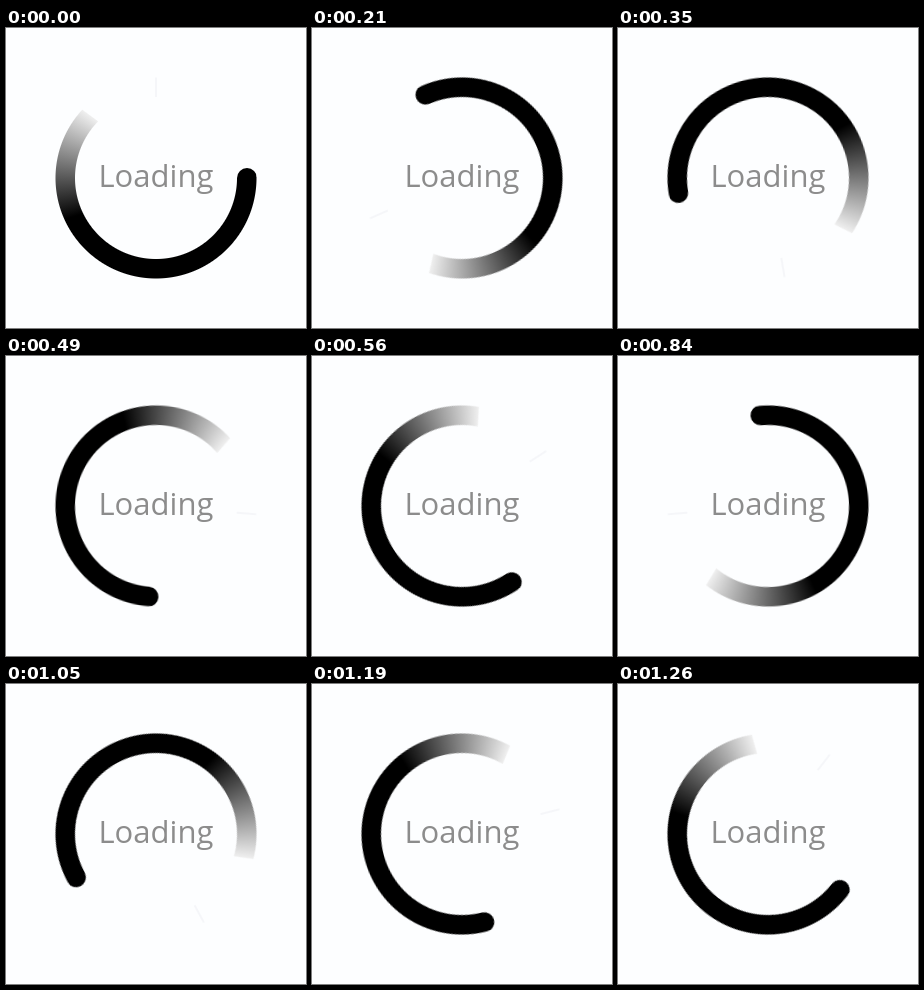
An HTML page that plays this animation: 300 px wide and 300 px high, repeating every 1.33 s.

```html
<!DOCTYPE html>
<html lang="en">
<head>
<meta charset="utf-8">
<title>Loading</title>
<style>
  html, body {
    margin: 0;
    width: 100%;
    height: 100%;
    overflow: hidden;
    background: #fdfeff;
  }

  .stage {
    position: relative;
    width: 300px;
    height: 300px;
  }

  /* Three-quarter arc whose tail fades out, clipped to a ring */
  .ring {
    position: absolute;
    inset: 0;
    background: conic-gradient(from 90deg at 174.7px 153.9px,
      #000 162deg, #eee 216deg, transparent 216.5deg 356deg, #000 356.5deg);
    -webkit-mask: radial-gradient(circle at center,
      transparent 80.5px, #000 81.5px 100px, transparent 101px);
    mask: radial-gradient(circle at center,
      transparent 80.5px, #000 81.5px 100px, transparent 101px);
    animation: spin 1330ms steps(19) infinite;
  }

  .ring::before,
  .ring::after {
    content: "";
    position: absolute;
  }

  /* Faint end of the arc */
  .ring::before {
    left: 148.5px;
    top: 49px;
    width: 2px;
    height: 20px;
    background: #f5f6f9;
  }

  /* Round head */
  .ring::after {
    left: 230.75px;
    top: 140px;
    width: 20px;
    height: 20px;
    border-radius: 50%;
    background: #000;
  }

  svg {
    position: absolute;
    inset: 0;
  }

  text {
    font: 31px "Open Sans", "Noto Sans", sans-serif;
    fill: #8c8c8c;
  }

  @keyframes spin {
    from { transform: rotate(0deg); }
    to { transform: rotate(-720deg); }
  }
</style>
</head>
<body>
  <div class="stage">
    <div class="ring"></div>
    <svg width="300" height="300"><text x="92.5" y="159">Loading</text></svg>
  </div>
</body>
</html>
```
